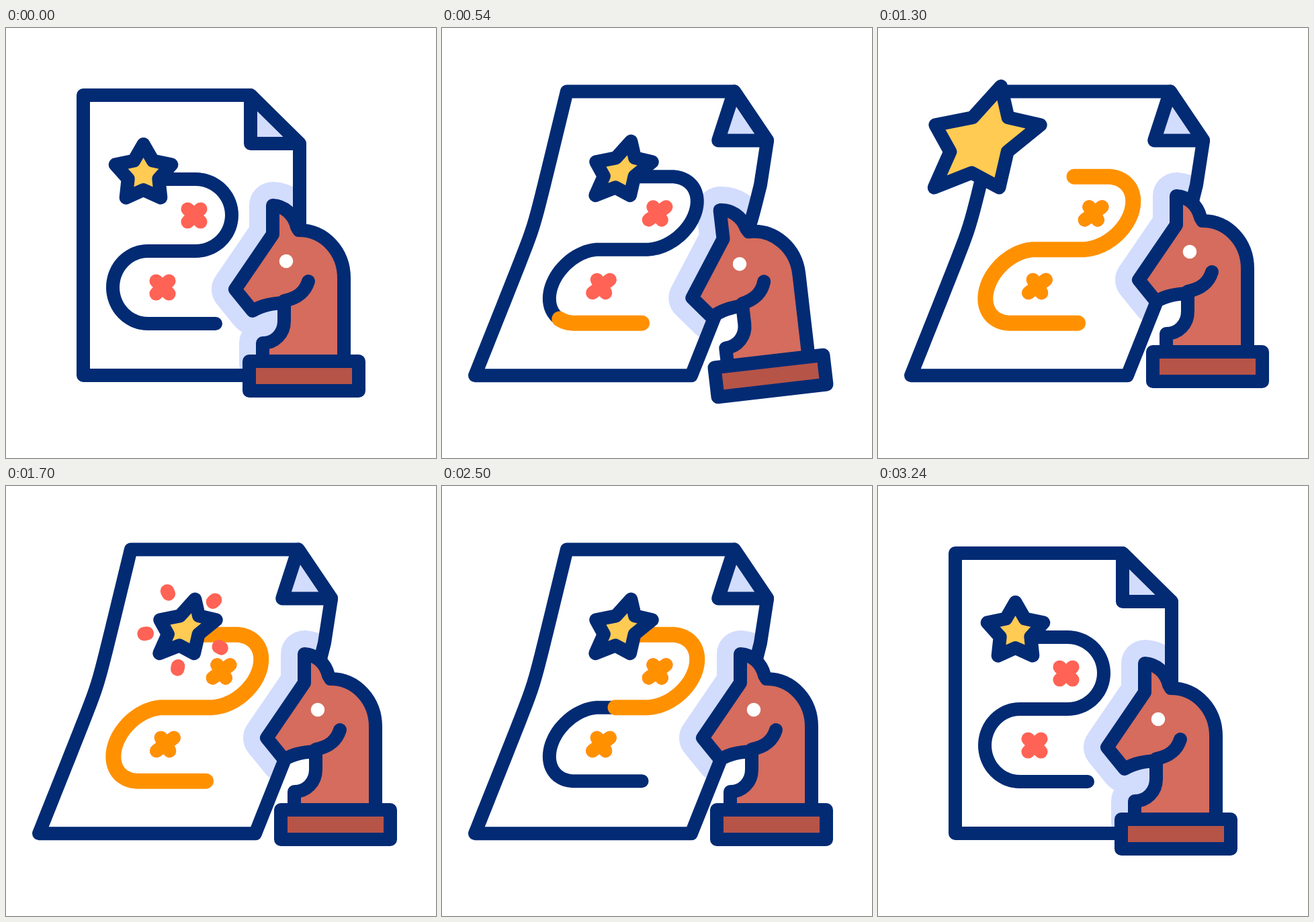
These frames come from a looping animation (640 px wide and 640 px high, 3.6 s). An HTML page with a canvas:

```html
<!DOCTYPE html>
<html lang="en">
<head>
<meta charset="utf-8">
<title>Strategy plan</title>
<style>
html, body { margin: 0; width: 100%; height: 100%; overflow: hidden; background: #fff; }
canvas { display: block; width: 100vmin; height: 100vmin; margin: auto; }
</style>
</head>
<body>
<canvas id="stage" width="640" height="640"></canvas>
<script>
const ctx = document.getElementById('stage').getContext('2d');
const LOOP = 3600;
const NAVY = '#022b74', RED = '#ff6355', ORANGE = '#ff9100', YELLOW = '#ffcb52',
      HALO = '#d2dcfd', HORSE = '#d56c5d', BASE = '#b65448';

const clamp = v => Math.max(0, Math.min(1, v));
const span = (t, a, b) => clamp((t - a) / (b - a));
const ease = u => u * u * (3 - 2 * u);
const mix = (a, b, u) => a + (b - a) * u;
const polar = (x, y, rx, ry, deg) => {
  const a = deg * Math.PI / 180;
  return [x + rx * Math.cos(a), y + ry * Math.sin(a)];
};

// The drawing on the sheet shears; the sheet itself also bends at mid-height
const rise = (y, lean) => y - 0.014 * (500 - y) * lean;
const shear = lean => ([x, y]) => [x + (4 - 0.342 * (y - 386)) * lean, rise(y, lean)];
const bend = lean => ([x, y]) => {
  const d = y - 300;
  return [x + (22 - 0.325 * d - 0.08 * Math.hypot(d, 25)) * lean, rise(y, lean)];
};

const body = new Path2D('M382 500V469C400 469 414 455 414 436V409C397 410 382 412 367 421L341 389L397 307V264' +
  'C413 265 428 276 433 296L436 301C475 301 503 334 503 372V500Z');
const cheek = new Path2D('M414 406C434 402 445 393 450 377');
const base = new Path2D('M362 496H525V540H362Z');

function line(path, color, width = 20) {
  ctx.strokeStyle = color;
  ctx.lineWidth = width;
  ctx.stroke(path);
}

function fill(path, color) {
  ctx.fillStyle = color;
  ctx.fill(path);
}

function poly(pts, close) {
  const p = new Path2D();
  pts.forEach(([x, y]) => p.lineTo(x, y));
  if (close) p.closePath();
  return p;
}

function routePoints() {
  const pts = [[312, 440]];
  for (let a = 90; a <= 270; a += 5) pts.push(polar(211, 386, 52, 54, a));
  for (let a = 90; a >= -90; a -= 5) pts.push(polar(282, 278.5, 54, 53.5, a));
  pts.push([233, 225]);
  return pts;
}

function starPoints() {
  const pts = [];
  for (let i = 0; i < 10; i++) {
    const r = i % 2 ? 24 : 44;
    pts.push(polar(204.5, 217, r, r, i * 36 - 90));
  }
  return pts;
}

// Part of a polyline between two fractions of its length
function section(pts, from, to) {
  const sizes = pts.slice(1).map((p, i) => Math.hypot(p[0] - pts[i][0], p[1] - pts[i][1]));
  const total = sizes.reduce((a, b) => a + b, 0);
  const a = from * total, b = to * total, out = [];
  let pos = 0;
  sizes.forEach((size, i) => {
    if (pos + size >= a && pos <= b) {
      const at = u => [mix(pts[i][0], pts[i + 1][0], u), mix(pts[i][1], pts[i + 1][1], u)];
      out.push(at(clamp((a - pos) / size)), at(clamp((b - pos) / size)));
    }
    pos += size;
  });
  return out;
}

function cross(x, y, lean, heat) {
  const h = 9.6, p = new Path2D();
  for (const s of [h, -h]) {
    p.addPath(poly([[x - s, y - h], [x + s, y + h]].map(shear(lean))));
  }
  line(p, RED);
  ctx.globalAlpha = heat;
  line(p, ORANGE);
  ctx.globalAlpha = 1;
}

function rocking(t) {
  if (t < 100 || t > 1190) return 0;
  if (t > 1000) return -11 * (1 - ease(span(t, 1000, 1190)));
  return -11 * Math.sin((t - 900) / 200 * Math.PI);
}

function lift(t) {
  if (t < 1100 || t > 2700) return 0;
  return 7 * (1 - Math.cos((t - 1100) / 200 * Math.PI));
}

function placeHorse(t, lean) {
  ctx.translate(443 + 47 * lean, 531 - lift(t));
  ctx.rotate(rocking(t) * Math.PI / 180);
  ctx.translate(-443, -531);
}

function drawPaper(t, lean) {
  const warp = bend(lean), tuck = 6 * lean;
  const top = [364, 100], inner = [364 - tuck, 172], corner = [437 - tuck, 172];
  const edge = [[115, 100], top, corner];
  for (let y = 237; y <= 517; y += 10) edge.push([437, y]);
  for (let y = 517; y > 100; y -= 10) edge.push([115, y]);
  const sheet = poly(edge.map(warp), true);
  fill(sheet, '#fff');
  ctx.save();
  ctx.clip(sheet);
  placeHorse(t, lean);
  line(body, HALO, 70);
  fill(body, HALO);
  ctx.restore();
  const fold = poly([top, inner, corner].map(warp), true);
  fill(fold, HALO);
  line(fold, NAVY);
  line(sheet, NAVY);
}

function drawRoute(t, lean) {
  const pts = routePoints().map(shear(lean));
  line(poly(pts), NAVY);
  const head = span(t, 446, 880), tail = span(t, 1950, 3000);
  if (head > 0 && tail < 1) line(poly(section(pts, tail, head)), ORANGE, 23);
  const cool = 1 - span(t, 2720, 2900);
  cross(280, 279, lean, span(t, 740, 800) * cool);
  cross(233, 386, lean, span(t, 640, 700) * cool);
}

function drawSparks(t) {
  const s = Math.sin(Math.PI * span(t, 1640, 2260));
  if (s < 0.001) return;
  const r = 59 * (1 + (s - 0.3) * 1.3);
  for (let a = -115.5; a < 240; a += 72) {
    line(poly([r - 2.2, r + 2.2].map(d => polar(266.5, 212, d, d, a))), RED, 20.5);
  }
}

function drawStar(t, lean) {
  const turn = Math.PI / 2;
  const u = t < 1230 ? Math.sin(turn * span(t, 850, 1230)) ** 2
                     : Math.cos(turn * span(t, 1230, 1480)) ** 2;
  const grow = 1.1 * ease(u), k = 1 + 0.87 * grow;
  const [cx, cy] = shear(lean)([204.5, 217]);
  const pts = starPoints().map(shear(lean)).map(([x, y]) =>
    [cx + (x - cx) * k - 137 * u, cy + (y - cy) * k - 43 * grow]);
  const p = poly(pts, true);
  fill(p, YELLOW);
  line(p, NAVY);
}

function drawHorse(t, lean) {
  ctx.save();
  placeHorse(t, lean);
  fill(body, HORSE);
  line(body, NAVY);
  line(cheek, NAVY);
  fill(base, BASE);
  line(base, NAVY);
  const eye = new Path2D();
  eye.arc(417, 347, 10.3, 0, 7);
  fill(eye, '#fff');
  ctx.restore();
}

function draw(now) {
  const t = now % LOOP;
  const lean = ease(span(t, 0, 440)) - ease(span(t, 2720, 3240));
  ctx.fillStyle = '#fff';
  ctx.fillRect(0, 0, 640, 640);
  ctx.lineCap = ctx.lineJoin = 'round';
  drawPaper(t, lean);
  drawRoute(t, lean);
  drawSparks(t);
  drawStar(t, lean);
  drawHorse(t, lean);
}

const start = performance.now();
function tick() {
  draw(performance.now() - start);
  requestAnimationFrame(tick);
}
tick();
</script>
</body>
</html>
```
